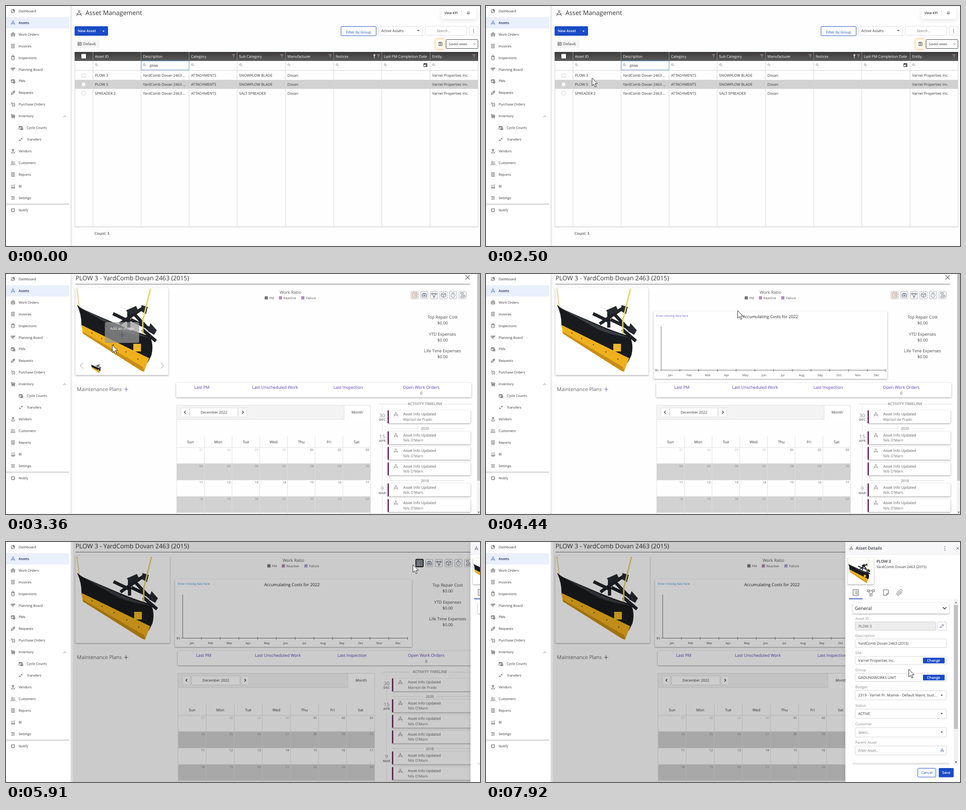
Recreate the animation shown at these times as an HTML page. Size 1050 by 533 pixels, loop 8 s.

```html
<!DOCTYPE html>
<html lang="en">
<head>
<meta charset="utf-8">
<title>Asset Management</title>
<style>
html,body{margin:0;width:100%;height:100%;overflow:hidden;background:#fefefe}
svg{display:block;width:100vw;height:100vh}
text{font-family:"Open Sans","Noto Sans",sans-serif;text-rendering:geometricPrecision;white-space:pre}
.m{text-anchor:middle}.e{text-anchor:end}.i{font-style:italic}
.s{font-weight:500}.b{font-weight:600}.bb{font-weight:700}
.ic{fill:none;stroke-width:.85;vector-effect:non-scaling-stroke;stroke-linejoin:round}
.card{filter:drop-shadow(0 1px 1.5px rgba(0,0,0,.42))}
.soft{filter:drop-shadow(0 2px 4px rgba(0,0,0,.12))}
.glow{filter:drop-shadow(0 0 3px #f0a840)}
</style>
</head>
<body>
<svg id="stage" viewBox="0 0 1050 533" preserveAspectRatio="none"></svg>
<script>
const BLUE = '#1a4bc6', INK = '#333', LINK = '#5a3db2';
const ORG = 'Varnel Properties Inc.', MAKER = 'Dovan', MODEL = 'YardComb Dovan 2463';
const FULL = MODEL + ' (2015)';

const ICONS = {
  pie: 'M5 1a4 4 0 1 0 4 4H5zM6.2.8a3.4 3.4 0 0 1 3 3h-3zM5 5 2.5 8',
  asset: 'M5 .6a1.3 1.3 0 1 0 .01 0zM4.4 3.2 1 9.6M5.6 3.2 9 9.6M.6 5.4Q5 9 9.4 5.4',
  box: 'M1 3.2h8v5.6H1zM3.2 3.2V1.4h3.6v1.8M1 6h8M4.3 5.2h1.4v1.4H4.3z',
  doc: 'M2 .8h6v8.4H2zM3.5 3h3M3.5 5h3M3.5 7h3',
  clip: 'M1.8 1.6h6.4v7.6H1.8zM3.8.6h2.4v1.8H3.8zM3.4 5.6l1.2 1.2 2-2.4',
  plan: 'M.8 1.5h3.4v3H.8zM5.4 1.5h3.8v2H5.4zM5 9V5l3-1.5M5 6 2.5 4.5',
  pm: 'M1 2h7v6H1zM1 4h7M3 .8V3M6 .8V3M5 6h4.5v3.5H5z',
  tag: 'M2 8 8 2M1 9l1-4 3-3 4-1-1 4-3 3zM5.8 3.2a.9.9 0 1 0 .01 0z',
  cart: 'M.6 1.2h1.6l1 5.2h5.6V2.6H2.5M4 8.2a.7.7 0 1 0 .01 0M8 8.2a.7.7 0 1 0 .01 0',
  stock: 'M.6 1h1.6v6h7M3.4 1.8h2.4v4H3.4zM6.6 2.6H9v3.2H6.6zM3.4 8a.8.8 0 1 0 .01 0M7.4 8a.8.8 0 1 0 .01 0',
  swap: 'M9.2.8 6 4M6 1.6V4h2.6M.8 9.2 4 6M1.4 6H4v2.4',
  man: 'M5 .8a1.9 1.9 0 1 0 .01 0zM2 9.2V7q3-3 6 0v2.2zM3 2.4h4',
  men: 'M3.4 1.2a1.7 1.7 0 1 0 .01 0zM.6 9V7q2.8-3 5.6 0v2zM6.8 1.6a1.4 1.4 0 1 1 0 3M7.4 5.6q2 .6 2 3H7',
  chart: 'M.8 9.2h8.4M2 9V6M4.2 9V5M6.4 9V6M8.6 9V3.6M1 4.4l3-2 2 1L9 .8',
  sliders: 'M.8 2h8.4M.8 5h8.4M.8 8h8.4M3 1.2v1.6M6.6 4.2v1.6M4 7.2v1.6',
  chip: 'M2 2h6v6H2zM3.4.8v1M6.6.8v1M3.4 8.2v1M6.6 8.2v1M.8 3.4h1M.8 6.6h1M8.2 3.4h1M8.2 6.6h1',
  grid: 'M.8 1.2h8.4v7.6H.8zM.8 3.6h8.4M.8 6.2h8.4M4 3.6v5.2',
  find: 'M4 1a2.8 2.8 0 1 0 .01 0zM6 6 9 9',
  save: 'M1 1h6.6L9 2.4V9H1zM3 1v2.4h3.6V1M5 5a1.3 1.3 0 1 0 .01 0z',
  date: 'M1 1.6h8v7.6H1zM1 2.6h8M1 3.3h8M3 .4v1M7 .4v1M5.6 5.6h2v2h-2z',
  list: 'M1 .6h8v8.8H1zM2.4 3h.8M4.2 3H8M2.4 5h.8M4.2 5H8M2.4 7h.8M4.2 7H8',
  tree: 'M.4 1.4h2.8v2.4H.4zM6.8 1.4h2.8v2.4H6.8zM3.8 7h2.8v2.4H3.8zM3.2 2.6h3.6M1.8 3.8 4.6 7M8.2 3.8 5.8 7',
  cube: 'M5 .6 9 2.6v5L5 9.4 1 7.6v-5zM1 2.6l4 2 4-2M5 4.6v4.8',
  watch: 'M5 2a3.7 3.7 0 1 0 .01 0zM3.8.6h2.4M5 3.6v2.4M8 1.8l.8.8',
  glass: 'M1 .8h6M1 9.2h5M1.6.8q0 3 2.4 4.2Q1.6 6 1.6 9.2M6.4.8q0 3-2.4 4.2M7.4 5a2.2 2.2 0 1 0 .01 0zM7.4 6v1.2h1',
  note: 'M1.4 1h7.2v5.4L6 9H1.4zM8.6 6.4H6V9',
  pin: 'M8.6 4.4 4.8 8.2a2 2 0 0 1-3-3L6 1a1.4 1.4 0 0 1 2.2 2L4.4 6.8a.7.7 0 0 1-1-1L6.6 2.6',
  pen: 'M1 9l.6-2.6L7 1l2 2-5.4 5.4zM6 2l2 2',
  x: 'M1 1l8 8M9 1 1 9', plus: 'M5 0v10M0 5h10',
  up: 'M1 7l4-4 4 4', down: 'M1 3l4 4 4-4', left: 'M7 1 3 5l4 4', right: 'M3 1l4 4-4 4'
};

const R = (x, y, w, h, fill, more = '') => `<rect x="${x}" y="${y}" width="${w}" height="${h}" fill="${fill}" ${more}/>`;
const B = (x, y, w, h, stroke, fill = '#fff', r = 2, more = '') => R(x + .5, y + .5, w - 1, h - 1, fill, `rx="${r}" stroke="${stroke}" ${more}`);
const T = (x, y, str, size = 8.1, fill = INK, cls = '') => `<text x="${x}" y="${y}" font-size="${size}" fill="${fill}" class="${cls}">${str}</text>`;
const P = (d, fill, more = '') => `<path d="${d}" fill="${fill}" ${more}/>`;
const L = (x1, y1, x2, y2, c, w = 1) => `<path d="M${x1} ${y1}L${x2} ${y2}" stroke="${c}" stroke-width="${w}"/>`;
const I = (name, x, y, s = 10, c = '#555', w = .85) =>
  `<path class="ic" d="${ICONS[name]}" stroke="${c}" style="stroke-width:${w}" transform="translate(${x - s / 2} ${y - s / 2}) scale(${s / 10})"/>`;
const G = (id, body, more = '') => `<g id="${id}" ${more}>${body}</g>`;
const caret = (x, y, c = '#333') => P(`M${x - 2.5} ${y - 1.3}h5l-2.5 2.8z`, c);
const dots = (x, y, gap, c) => [-1, 0, 1].map(i => `<circle cx="${x}" cy="${y + i * gap}" r=".9" fill="${c}"/>`).join('');
const plow = (x, y, sx, sy = sx) => `<use href="#plow" transform="translate(${x} ${y}) scale(${sx} ${sy})"/>`;
const each = (list, fn) => list.map(fn).join('');

function plowShape() {
  return P('M3 1 8 41', 'none', 'stroke="#dcc65a" stroke-width="1.6"')
    + P('M83 57 118 74M98 80 150 44M118 48V88M122 70 176 96M148 92 178 118M132 60 162 92', 'none', 'stroke="#1d2025" stroke-width="7"')
    + P('M112 50 134 40 140 52 120 60zM146 38 160 42 156 58 146 52zM166 78 180 94 174 104 160 96z', '#262a30')
    + P('M166 2 149 72V104', 'none', 'stroke="#e6d664" stroke-width="3"')
    + P('M3 37Q9 43 18 48L110 88Q140 100 165 107Q174 128 168 150L160 166 13 85Q14 60 3 37z', '#181a1d')
    + P('M8 43 110 91 164 110Q120 104 92 91z', '#3a3d41')
    + P('M13 82 163 156 152 186 146 184 16 101z', '#efb01e')
    + P('M16 97 150 176 152 186 146 184 16 101z', '#c98e14')
    + each([[36, 100], [58, 112], [84, 126], [112, 142], [138, 158]], ([x, y]) => `<circle cx="${x}" cy="${y}" r="1.2" fill="#4a3a12"/>`)
    + R(128, 124, 17, 17, '#f0b726');
}

function sidebar() {
  const items = [['pie', 'Dashboard'], ['asset', 'Assets'], ['box', 'Work Orders'], ['doc', 'Invoices'], ['clip', 'Inspections'],
    ['plan', 'Planning Board'], ['pm', 'PMs'], ['tag', 'Requests'], ['cart', 'Purchase Orders'], ['stock', 'Inventory'],
    ['pm', 'Cycle Counts', 1], ['swap', 'Transfers', 1], ['man', 'Vendors'], ['men', 'Customers'], ['doc', 'Reports'],
    ['chart', 'BI'], ['sliders', 'Settings'], ['chip', 'Notify']];
  return R(0, 0, 143, 533, '#fff') + R(143, 0, 6, 533, 'url(#edge)') + R(0, 25, 140, 25, '#e9effb')
    + each(items, ([ic, name, sub], n) => {
      const y = n === 17 ? 453.5 : 11.2 + n * 25.93, on = n === 1;
      return I(ic, sub ? 33 : 15.5, y, 10, on ? '#2c62c9' : '#4a4a4a')
        + T(sub ? 46 : 28, y + 2.7, name, 7.5, on ? '#1b2c55' : INK, on ? 'b' : 's');
    })
    + I('up', 130, 245, 7, '#555') + L(0, 440, 140, 440, '#999');
}

function listPage() {
  const cols = [192.5, 299, 405.5, 512, 619, 726, 832.5, 939.5];
  const heads = ['Asset ID', 'Description', 'Category', 'Sub Category', 'Manufacturer', 'Notices', 'Last PM Completion Date', 'Entity'];
  const rows = [['PLOW 3', 'SNOWPLOW BLADE'], ['PLOW 5', 'SNOWPLOW BLADE'], ['SPREADER 2', 'SALT SPREADER']];
  const funnel = x => P(`M${x - 4.5} 107h9l-3.4 4v4.4l-2.2-1V111z`, '#84716f');
  return R(143, 0, 907, 533, '#fefefe')
    + I('asset', 162, 16, 14, '#333', 1) + T(176, 20, 'Asset Management', 14)
    + R(965, 2, 77, 27, '#fff', 'rx="3" class="soft"') + T(971, 17.7, 'View KPI', 7.3, INK, 'b') + L(1009, 9, 1009, 20, '#ddd') + I('chart', 1024, 14.5, 7)
    + R(152, 45, 74, 21, BLUE, 'rx="2"') + T(159, 58.3, 'New Asset', 8, '#fff', 'b') + caret(216, 56, '#fff')
    + B(741.5, 45, 79, 21.5, BLUE) + T(781, 60.5, 'Filter by Group', 8.05, BLUE, 'm')
    + B(825, 45, 98, 21, '#dcdcdc') + T(831, 58.3, 'Active Assets', 8.25) + caret(913, 54.5)
    + B(928, 44.5, 93, 21, '#dcdcdc') + T(969, 58.3, 'Search...', 8, '#777', 'm i')
    + B(1025.5, 44.5, 20.5, 21, '#dcdcdc') + dots(1036, 55, 3, '#4a5a80')
    + R(155, 75.5, 52, 17.5, '#f5f5f5', 'rx="3"') + I('grid', 163, 84, 9) + T(171, 87, 'Default', 8.2)
    + R(952, 74, 20.5, 21.5, '#fff8ec', 'rx="3" class="glow"') + I('save', 962.5, 84.3, 9, '#333')
    + B(974.5, 74, 71.5, 21, '#444') + T(981, 87.2, 'Saved views', 7.3) + I('down', 1038, 84.3, 7.5, '#444')
    + R(152, 102, 894, 20, 'url(#head)')
    + R(152, 164, 894, 20, '#d2d2d2')
    + each(cols, (x, n) => L(x, 102, x, 122, '#8a8a8a') + L(x, 122, x, 490, '#d6d6d6')
      + T(x + 4.5, 114.6, heads[n], 8.1, '#fff') + I('find', x + 8, 131, 7, n === 6 || n === 1 ? '#666' : '#5d7a78'))
    + each([504, 611, 718, 825, 1037], funnel)
    + P('M816 115.5V107.5M813.8 109.8 816 107.4 818.2 109.8', 'none', 'stroke="#fff" stroke-width="1.2"')
    + R(167, 106.5, 10, 10, '#fff', 'rx="1"')
    + L(152, 143, 1046, 143, '#cfcfcf') + L(152.5, 122, 152.5, 490, '#d0d0d0') + L(1045.5, 122, 1045.5, 490, '#d6d6d6') + L(152, 490.5, 1046, 490.5, '#bdbdbd')
    + B(299, 121.5, 107, 21, '#5b93cf', 'none', 0) + T(318, 135, 'plow', 8.3)
    + I('date', 929, 131, 9, '#222', 1)
    + each(rows, ([id, kind], n) => {
      const y = 157.2 + n * 19.7;
      return B(167.5, y - 7.3, 9, 9, '#d5d5d5', '#fff', 1)
        + each([id, MODEL + ' ...', 'ATTACHMENTS', kind, MAKER, '', '', ORG], (s, c) => s && T(cols[c] + 4.5, y, s, 8.07));
    })
    + T(196, 507.6, 'Count: 3', 8.2, '#555', 'b');
}

function chart(dx, link) {
  const months = 'Jan Feb Mar Apr May Jun Jul Aug Sep Oct Nov Dec'.split(' ');
  return T(377 + dx, 95.2, 'Enter missing data here', 6.43, link) + T(630 + dx, 98.2, 'Accumulating Costs for 2022', 9.26, '#222', 'm')
    + L(388 + dx, 117, 388 + dx, 214, '#666') + L(385 + dx, 213.5, 886 + dx, 213.5, '#666') + T(382 + dx, 216, '$0', 6.8, '#444', 'e')
    + each(months, (m, n) => L(429.5 + dx + n * 41.5, 211, 429.5 + dx + n * 41.5, 217, '#666') + T(408.4 + dx + n * 41.5, 227.3, m, 6.8, '#444', 'm'));
}

function calendar(X) {
  const x0 = X(378), cell = (X(807.5) - x0) / 7, cx = n => x0 + cell * n, w = cell * 7;
  let s = R(x0, 291.5, w, 31.5, '#f3f3f3') + L(x0, 291.5, cx(7), 291.5, '#ddd') + L(x0, 323, cx(7), 323, '#ddd')
    + R(X(749), 292, X(807.5) - X(749), 32, '#fff') + L(X(749), 292, X(749), 323, '#ddd') + T(X(778), 310, 'Month', 8.1, INK, 'm')
    + B(X(387), 297, 19, 21, '#ddd') + I('left', X(396.5), 307, 8, '#222', 1.2)
    + B(X(407), 297, X(513.5) - X(407), 21, '#ddd') + T(X(460.5), 310, 'December 2022', 8, INK, 'm')
    + B(X(515), 297, 19, 21, '#ddd') + I('right', X(524.5), 307, 8, '#222', 1.2)
    + R(x0, 421, w, 36.5, '#d1d2d1') + R(x0, 494, w, 36, '#d1d2d1');
  for (let n = 0; n < 8; n++) s += L(cx(n), n % 7 ? 360 : 291, cx(n), 533, '#dedede');
  for (const y of [385, 421, 457.5, 494, 530]) s += L(x0, y, cx(7), y, '#dedede');
  s += each(['Sun', 'Mon', 'Tue', 'Wed', 'Thu', 'Fri', 'Sat'], (d, n) => T(cx(n + .5), 375.6, d, 8.35, INK, 'm'));
  for (let n = 0; n < 35; n++) {
    const row = n / 7 | 0, day = n < 4 ? n + 27 : n - 3;
    s += T(cx(n % 7 + 1) - 3.2, 392.7 + row * 36.3, String(day).padStart(2, '0'), 6.9, n < 4 ? '#bbb' : row % 2 ? '#858585' : '#555', 'e');
  }
  return s;
}

function timeline(X) {
  const who = ['Marisol de Prado', "Nils O'Marn"];
  const rule = (y, a, b) => L(X(a[0]), y, X(a[1]), y, '#ddd') + L(X(b[0]), y, X(b[1]), y, '#ddd');
  return T(X(928), 291, 'ACTIVITY TIMELINE', 8.2, '#9a9a9a', 'm bb') + rule(289, [824, 885], [971, 1031])
    + each([[293, 305], [330, 352], [378, 468], [492, 533]], ([a, b]) => L(X(833.5), a, X(833.5), b, '#e2e2e2'))
    + each([[317.5, '30', 'DEC'], [364.5, '15', 'APR'], [480.3, '9', 'MAR']], ([y, d, m]) =>
      T(X(833.5), y, d, 11.2, '#888', 'm') + T(X(833.5), y + 8.7, m, 7.3, '#888', 'm bb'))
    + each([[343, '2020'], [458.5, '2018']], ([y, s]) => T(X(928), y + 3, s, 7.8, '#888', 'm b') + rule(y, [846, 914], [942, 1016]))
    + each([303, 349.6, 384, 418.6, 465.3, 500], (y, n) =>
      R(X(846), y, X(1029) - X(846), 28.5, '#fff', 'class="card"') + R(X(845.5), y, 2.6, 28.5, '#6d1150')
      + I('asset', X(863.5), y + 8.5, 11, '#777')
      + T(X(880), y + 11.2, 'Asset Info Updated', 8.2, '#555') + T(X(880), y + 22.6, who[n ? 1 : 0], 8.1, '#666'));
}

// k is the horizontal spread of the layout; it grows when the scroll bar goes
function detailPage(k, id) {
  const X = x => 150 + (x - 150) * k, wide = k > 1;
  const card = (a, y, b, h) => R(X(a), y, X(b) - X(a), h, '#fff', 'class="card"');
  const legend = [[573, 'PM', '#75757a'], [604.5, 'Reactive', wide ? '#b084b4' : '#b087c9'], [654, 'Failure', wide ? '#a5a0dc' : '#b087c9']];
  const stats = [[434, 'Last PM'], [596, 'Last Unscheduled Work'], [758, 'Last Inspection'], [920, 'Open Work Orders']];
  return R(143, 0, 907, 533, '#fefefe')
    + T(154, 13.6, `PLOW 3 - ${FULL}`, 13.8) + L(154, 22.5, X(1028), 22.5, '#666') + I('x', X(1022.5), 7.5, 11.5, '#444', 1.1)
    + card(153.5, 31, 360, 193.5)
    + G(id + 'photo', plow(154, 31, k, 1))
    + (wide ? '' : G('hover', R(219, 107, 76, 46, '#999', 'rx="4" opacity=".72"') + T(257, 123.5, 'Add an image', 8.3, '#fff', 'm')
      + I('plus', 257, 135, 13, '#44546e', 1) + I('left', 167.5, 203.5, 17, '#c4c4c4', 1.4) + I('right', 346, 203.5, 17, '#c4c4c4', 1.4) + plow(188, 196, .125)))
    + T(X(630), 44, 'Work Ratio', 9.4, '#555', 'm')
    + each(legend, ([x, s, c]) => R(X(x), 49.5, 7, 7, c) + T(X(x) + 10.2, 56, s, 7.2, '#555'))
    + each(['list', 'box', 'tree', 'cube', 'watch', 'glass'], (ic, n) => {
      const x = X(905.5 + n * 21.2), dim = wide && !n;
      return B(x - 8.5, 38, 17, 17.5, dim ? '#111' : '#aaa', dim ? '#aaa' : '#fff', 2, dim ? 'stroke-width="2"' : '')
        + I(ic, x, 46.7, 12, n || wide ? '#39435c' : '#8a5a3c');
    })
    + (wide ? '' : G('tile', B(897, 38, 17, 17.5, '#888', '#ddd') + I('list', 905.5, 46.7, 12, '#444')))
    + each(['Top Repair Cost', 'YTD Expenses', 'Life Time Expenses'], (s, n) =>
      T(X(967), 99 + n * 37.6, s, 9.22, '#444', 'm') + T(X(967), 112 + n * 37.6, '$0.00', 9.1, '#444', 'm'))
    + G(id + 'chart', card(371, 83, 889, 150) + chart(wide ? 3.4 : 0, wide ? '#2b8fcf' : '#6a5fc4'))
    + card(377, 241.5, 1031, 32.5)
    + each(stats, ([x, s]) => T(X(x), 255.2, s, 9.25, LINK, 'm')) + T(X(920), 268.2, '0', 9, '#555', 'm')
    + T(157, 260.2, 'Maintenance Plans', 11.3, '#666') + I('plus', 266, 256.3, 9, wide ? '#555' : '#7a62b8', 1.1)
    + calendar(X) + G(id + 'time', timeline(X))
    + (wide ? '' : R(1043, 0, 7, 533, '#f1f1f1') + R(1044, 0, 6, 459, '#c1c1c1') + P('M1045 528h4l-2 3z', '#444'));
}

function panel() {
  const field = (y, h, s, name, ly, more = '', cls = '') => T(818, ly, name, 8.1, '#888') + B(817.5, y, 203, h, '#d4d4d4')
    + T(824.5, y + h / 2 + 2.9, s, 8.1, cls ? '#777' : INK, cls) + more;
  const change = y => R(968, y, 48, 12.5, BLUE, 'rx="1"') + T(991.5, y + 9.2, 'Change', 8, '#fff', 'm b');
  return R(796, 0, 254, 533, '#fff') + R(796, 0, 254, 28, '#f7f7f9') + L(796, 28, 1050, 28, '#eee')
    + I('asset', 809, 14, 9) + T(819, 17.2, 'Asset Details', 9.4, '#3a3f4a', 'b') + dots(1016.5, 14, 4.2, '#444') + I('x', 1045, 14, 6.5, '#555', 1)
    + R(801, 36, 58, 58, '#fff', 'rx="2" class="card"') + plow(801.5, 37, .276, .29)
    + T(865, 46, 'PLOW 3', 8.7, INK, 'b') + T(865, 57.8, FULL, 8.05)
    + I('list', 819, 112.3, 15, '#555', 1) + I('tree', 852.5, 112.3, 17, '#555', 1) + I('note', 886, 112.3, 15, '#555', 1) + I('pin', 916, 112.3, 16, '#555', 1)
    + L(804, 127, 1046, 127, '#eee') + R(804, 125.3, 30, 1.8, '#2c4fc0')
    + R(812, 135, 214, 24, '#fff', 'class="card"') + T(817, 150.5, 'General', 10.3, '#222') + I('down', 1016, 146.8, 10, '#222', 1.4)
    + T(818, 172.7, 'Asset ID', 8.15, '#888') + B(817.5, 177, 179.5, 19.5, '#ccc', '#ececec') + T(825, 189.7, 'PLOW 3', 8.1, '#555')
    + B(999.5, 177, 21, 19.5, '#ccc') + I('pen', 1010, 186.7, 10, '#45537a')
    + field(215, 20, FULL, 'Description', 211)
    + field(253.5, 19, ORG, 'Site', 248.7, change(257))
    + field(291.5, 18.5, 'GROUNDWORKS UNIT', 'Group', 287, change(294.7))
    + field(329.5, 21.5, '2319 - Varnel Pr. Mainte - Default Maint. bud...', 'Budget', 324.8, caret(1009.5, 340.5))
    + field(370.5, 21.5, 'ACTIVE', 'Status', 366, caret(1009.5, 381))
    + field(412, 21.5, 'Select...', 'Customer', 406.8, caret(1009.5, 422.5), 'i')
    + field(452.5, 21, 'Enter Asset...', 'Parent Asset', 448, I('asset', 1010.5, 462.5, 9, '#4d6391'), 'i')
    + R(812, 489, 214, 5, 'url(#fold)')
    + R(1036, 128, 10, 367, '#f1f1f1') + R(1036.5, 140, 9, 275, '#c1c1c1') + P('M1038.5 136h5l-2.5-3.4z', '#777') + P('M1038.5 487.5h5l-2.5 3.4z', '#444')
    + B(956, 502, 41, 20.5, BLUE) + T(976.5, 515, 'Cancel', 8.1, BLUE, 'm') + R(1003, 502, 33, 20.5, BLUE, 'rx="2"') + T(1019.3, 515, 'Save', 8.1, '#fff', 'm b');
}

const grad = (id, a, b, dir) => `<linearGradient id="${id}" ${dir}><stop stop-color="${a}"/><stop offset="1" stop-color="${b}"/></linearGradient>`;
const DOWN = 'x2="0" y2="1"';
document.getElementById('stage').innerHTML =
  `<defs>${grad('edge', '#d9d9d9', '#fefefe00', '')}${grad('head', '#3a3a3a', '#5c5c5c', DOWN)}${grad('fold', '#ffffff', '#d4d4d4', DOWN)}${G('plow', plowShape())}</defs>`
  + G('list', listPage()) + G('narrow', detailPage(1, 'n')) + G('wide', detailPage(1.014, 'w'))
  + R(143, 0, 907, 533, '#000', 'id="dim"') + sidebar() + L(0, 532.5, 1050, 532.5, '#00000012') + G('panel', panel(), 'class="soft"')
  + G('tip', R(908, 62, 134.5, 18.5, '#222') + T(914, 74.8, FULL, 8.8, '#fff'))
  + G('arrow', P('M.5.5V17.6L4.4 14 7.2 20.4 9.8 19.2 7 13H12.4z', '#fff', 'stroke="#111" stroke-width=".9"'))
  + G('beam', P('M-4.5-9Q0-9 0-7.5Q0-9 4.5-9M0-8V8M-4.5 9Q0 9 0 7.5Q0 9 4.5 9', 'none', 'stroke="#111" stroke-width="1.6"'));

const LOOP = 8000;
// start, end, number of steps, path
const MOVES = [
  [660, 1420, 11, [[1058, 552], [640, 330], [430, 230], [339, 185]]],
  [1500, 2270, 11, [[339, 185], [230, 136], [181, 124], [200, 150], [227, 167]]],
  [2350, 2580, 4, [[227, 167], [234, 162], [235, 157]]],
  [3830, 3910, 2, [[235, 157], [232, 157]]],
  [4060, 4830, 11, [[232, 157], [532, 83], [807, 57]]],
  [4900, 5680, 11, [[807, 57], [868, 56], [896, 52], [901, 50]]],
  [7000, 7770, 11, [[902, 50], [915, 120], [930, 215], [935, 266]]],
  [7840, 7920, 2, [[935, 266], [936, 282]]]
];
const SLIDE = [1050, 1050, 1050, 1029, 962, 884, 826, 801, 796];
const FADE = [0, .3, .65, .9, 1];
const el = id => document.getElementById(id);
const show = (id, on) => el(id).setAttribute('display', on ? 'inline' : 'none');
const place = (id, x, y) => el(id).setAttribute('transform', `translate(${x} ${y})`);
const step = (t, a, b, n) => t < a ? 0 : Math.min(n, Math.floor((t - a) / (b - a) * (n - 1) + 1.1));

function pointer(t) {
  const [a, b, n, pts] = MOVES.filter(m => t >= m[0]).pop() || MOVES[0];
  const f = step(t, a, b, n) / n * (pts.length - 1), i = Math.min(pts.length - 2, Math.floor(f));
  return [0, 1].map(c => pts[i][c] + (pts[i + 1][c] - pts[i][c]) * (f - i));
}

function draw(t) {
  const [x, y] = pointer(t), wide = t >= 5760;
  const fade = FADE[step(t, 2730, 2970, 4)], open = step(t, 5760, 6310, 8), left = SLIDE[open];
  const beam = left < 900 && t < 7000;
  show('list', fade < 1);
  show('narrow', fade > 0 && !wide);
  el('narrow').setAttribute('opacity', fade);
  show('wide', wide);
  show('ntime', t >= 3120);
  show('nphoto', t >= 3200);
  show('hover', t >= 3280 && x < 360);
  show('nchart', t >= 3430);
  el('nchart').setAttribute('opacity', t < 3530 ? .6 : 1);
  show('tile', x > 897 && t > 4900);
  el('dim').setAttribute('opacity', [0, .1][open] ?? .2);
  show('panel', left < 1050);
  place('panel', left - 796, 0);
  show('tip', t >= 6690 && t < 7000);
  show('arrow', t >= 660 && !beam);
  show('beam', beam);
  place('arrow', x, y);
  place('beam', 902, 50.5);
}

const begin = performance.now();
function tick() {
  draw((performance.now() - begin) % LOOP);
  requestAnimationFrame(tick);
}
tick();
</script>
</body>
</html>
```
